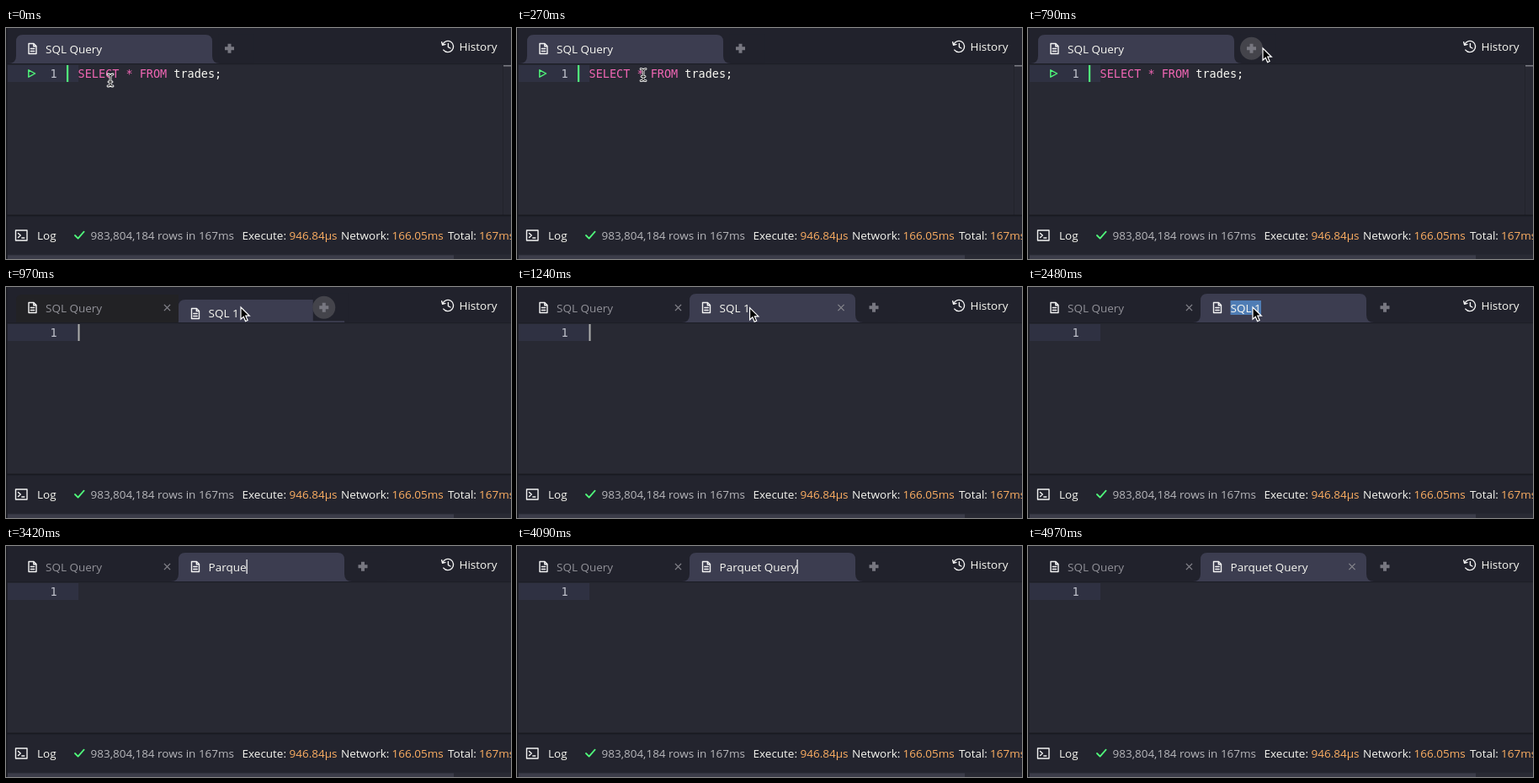
Write an HTML page that moves like this. It is 600 px wide and 274 px high and loops after 5000 ms.

```html
<!DOCTYPE html>
<html lang="en">
<head>
<meta charset="utf-8">
<title>SQL editor tabs</title>
<style>
  html, body { margin: 0; width: 100%; height: 100%; overflow: hidden; background: #21222c; }
  svg { display: block; width: 600px; height: 274px; }
  text { font: 13.5px "Open Sans", "Noto Sans", sans-serif; fill: #f8f8f2; white-space: pre; }
  .code { font-family: "DejaVu Sans Mono", monospace; }
  .pink { fill: #f066b4; }
  .orange { fill: #fcae62; }
  .gray { fill: #b7b7bb; }
  .line { fill: none; stroke: #f4f4f4; stroke-width: 1.4; stroke-linejoin: round; stroke-linecap: round; }
  .green { stroke: #50fa7b; }
  .close { fill: none; stroke: #85858c; stroke-width: 1.3; }
</style>
</head>
<body>
<svg viewBox="0 0 600 274">
  <defs>
    <g id="doc" class="line">
      <path d="M-4.5 -6H1.5L4.5 -3V6H-4.5ZM1.3 -5.8V-2.8H4.3M-2.2 0H2.2M-2.2 3H2.2"/>
    </g>
    <path id="cross" class="close" d="M-3.6 -3.6L3.6 3.6M3.6 -3.6L-3.6 3.6"/>
  </defs>

  <rect width="600" height="274" fill="#21222c"/>

  <path id="firstShape" fill="#3c3d50"/>
  <path id="fadingTab" d="M12 42V16Q12 9 19 9H205V42Z" fill="#222225"/>
  <use href="#doc" x="31.5" y="24.5"/>
  <text id="firstTitle" x="47" y="29.5">SQL Query</text>
  <use id="firstClose" href="#cross" x="191.5" y="24.5"/>

  <g id="newTab">
    <path id="newShape" fill="#3c3d50"/>
    <use href="#doc" x="225" y="24.5"/>
    <rect id="selection" x="240.5" y="16" width="36.5" height="17" fill="#4f7db5"/>
    <text id="newTitle" x="240.5" y="29.5"></text>
    <rect id="titleCaret" y="16" width="1.2" height="17" fill="#fff"/>
    <use id="newClose" href="#cross" x="385" y="24.5"/>
  </g>

  <g id="plus">
    <rect x="-13" y="-17" width="42" height="33" fill="#21222c"/>
    <circle id="plusHover" r="13.5" fill="#44444b"/>
    <path d="M-5.5 0H5.5M0 -5.5V5.5" stroke="#777780" stroke-width="4"/>
  </g>

  <g class="line" transform="translate(525 22)">
    <path d="M-6 -2.8A6.6 6.6 0 1 1 -5.2 4.1M-7.3 -5.2L-6.4 -1.8L-3 -2.6M.4 -3.6V.6L3 2"/>
  </g>
  <text x="538.5" y="26.8">History</text>

  <rect y="43" width="600" height="180" fill="#282933"/>
  <rect y="42" width="600" height="1.2" fill="#1d1e27"/>
  <rect x="2" y="44" width="84" height="20" fill="#2f3142"/>
  <text class="code" x="52.5" y="59" style="fill:#c3c5cf">1</text>
  <g id="query">
    <path class="line green" d="M26.8 49.8L34.6 54L26.8 58.2Z"/>
    <rect x="72" y="44" width="2.2" height="20" fill="#50fa7b"/>
    <text class="code" x="85.5" y="59"><tspan class="pink">SELECT * FROM</tspan> trades;</text>
    <path d="M590.5 44V222" stroke="#22232c"/>
    <rect x="591" y="44" width="9" height="1.6" fill="#777880"/>
  </g>
  <rect id="editorCaret" x="85.5" y="44" width="2" height="20" fill="#aeafad"/>

  <rect y="221.5" width="600" height="2" fill="#191a21"/>
  <rect y="223.5" width="600" height="45" fill="#23242e"/>
  <path class="line" d="M11.5 240H25V252H11.5ZM14.5 243.5L17.3 246L14.5 248.5M18.8 249H21.8"/>
  <path class="line green" style="stroke-width:1.8" d="M82 246L85.6 249.6L92.6 241.6"/>
  <g id="log"></g>
  <rect y="268.5" width="600" height="5.5" fill="#292a34"/>
  <rect x="2" y="269.5" width="530" height="4.5" fill="#3b3c49"/>
  <rect width="1.5" height="274" fill="#191a21"/>

  <g id="pointer">
    <path id="arrow" d="M0 0V14.2L3.3 11.2L5.6 16.6L8.1 15.5L5.8 10.2H10.3Z" fill="#000" stroke="#fff" stroke-width="1.2"/>
    <g id="beam" fill="none" stroke-linecap="round">
      <path d="M-3 -7Q0 -7 0 -5V5Q0 7 -3 7M3 -7Q0 -7 0 -5M0 5Q0 7 3 7M-2 2H2" stroke="#fff" stroke-width="2.8"/>
      <path d="M-3 -7Q0 -7 0 -5V5Q0 7 -3 7M3 -7Q0 -7 0 -5M0 5Q0 7 3 7M-2 2H2" stroke="#111" stroke-width="1"/>
    </g>
  </g>
</svg>

<script>
const LOOP = 5000;
const TITLE = "Parquet Query";
const OPEN = 925, RENAME = 1700, COMMIT = 4910;
const KEY_TIMES = [2850, 2950, 3050, 3170, 3270, 3360, 3480, 3590, 3740, 3850, 3910, 3970, 4030];
const POINTER = [[0, 124, 62], [120, 124, 62], [700, 279, 24], [1120, 279, 24], [1450, 271, 26],
                 [1800, 271, 26], [2180, 267, 24]];
const LOG = [[37, "Log", ""], [100.5, "983,804,184 rows in 167ms", "gray"],
             [280.5, "Execute:", ""], [336.5, "946.84µs", "orange"],
             [398, "Network:", ""], [458.5, "166.05ms", "orange"],
             [525, "Total:", ""], [562, "167ms", "orange"]];

const el = Object.fromEntries([...document.querySelectorAll("[id]")].map(n => [n.id, n]));
const show = (node, on) => { node.style.visibility = on ? "visible" : "hidden"; };
const move = (node, x, y) => node.setAttribute("transform", `translate(${x} ${y})`);
const progress = (t, from, to) => Math.min(1, Math.max(0, (t - from) / (to - from)));
const smooth = p => p * p * (3 - 2 * p);

const tabPath = (l, r) =>
  `M${l - 9} 42Q${l} 42 ${l} 33V16Q${l} 8 ${l + 8} 8H${r - 8}Q${r} 8 ${r} 16V33Q${r} 42 ${r + 9} 42V60H${l - 9}Z`;

el.firstShape.setAttribute("d", tabPath(12, 245));
el.newShape.setAttribute("d", tabPath(205, 402));
el.log.innerHTML = LOG.map(([x, s, c]) => `<text class="${c}" x="${x}" y="251">${s}</text>`).join("");

function pointerAt(t) {
  const i = POINTER.findIndex(p => p[0] > t);
  if (i < 0) return POINTER.at(-1).slice(1);
  const [t0, x0, y0] = POINTER[i - 1], [t1, x1, y1] = POINTER[i];
  const p = smooth(progress(t, t0, t1));
  return [x0 + (x1 - x0) * p, y0 + (y1 - y0) * p];
}

function drawTitle(t) {
  const typed = KEY_TIMES.filter(k => k <= t).length;
  const title = typed ? TITLE.slice(0, typed) : "SQL 1";
  if (el.newTitle.textContent !== title) el.newTitle.textContent = title;
  const lastKey = KEY_TIMES[typed - 1];
  const caretOn = typed > 0 && t < COMMIT && t - lastKey < 490;
  show(el.titleCaret, caretOn);
  if (caretOn) el.titleCaret.setAttribute("x", 240.5 + el.newTitle.getComputedTextLength());
  return typed;
}

function draw(t) {
  const opened = t >= OPEN;
  show(el.firstShape, !opened);
  show(el.query, !opened);
  show(el.firstClose, opened);
  show(el.newTab, opened);
  el.firstTitle.style.fill = opened ? "#919198" : "";
  el.fadingTab.style.opacity = opened ? 1 - progress(t, 1000, 1120) : 0;
  move(el.newTab, 0, 10 * (1 - smooth(progress(t, OPEN, OPEN + 125))));

  const slide = 1 - (1 - progress(t, OPEN, OPEN + 100)) ** 2;
  move(el.plus, 265.5 + 158.5 * slide, 24.2);
  show(el.plusHover, t >= 620 && t < 1050);
  show(el.editorCaret, opened && t < 1440);

  const typed = opened ? drawTitle(t) : 0;
  show(el.titleCaret, opened && el.titleCaret.style.visibility === "visible" && typed > 0);
  show(el.selection, t >= RENAME && !typed);
  show(el.newClose, opened && (t < RENAME || t >= COMMIT));

  const [x, y] = pointerAt(t);
  move(el.pointer, x, y);
  const visible = !typed;
  show(el.arrow, visible && y < 43);
  show(el.beam, visible && y >= 43);
}

const start = performance.now();
function tick() {
  draw((performance.now() - start) % LOOP);
  requestAnimationFrame(tick);
}
tick();
</script>
</body>
</html>
```
